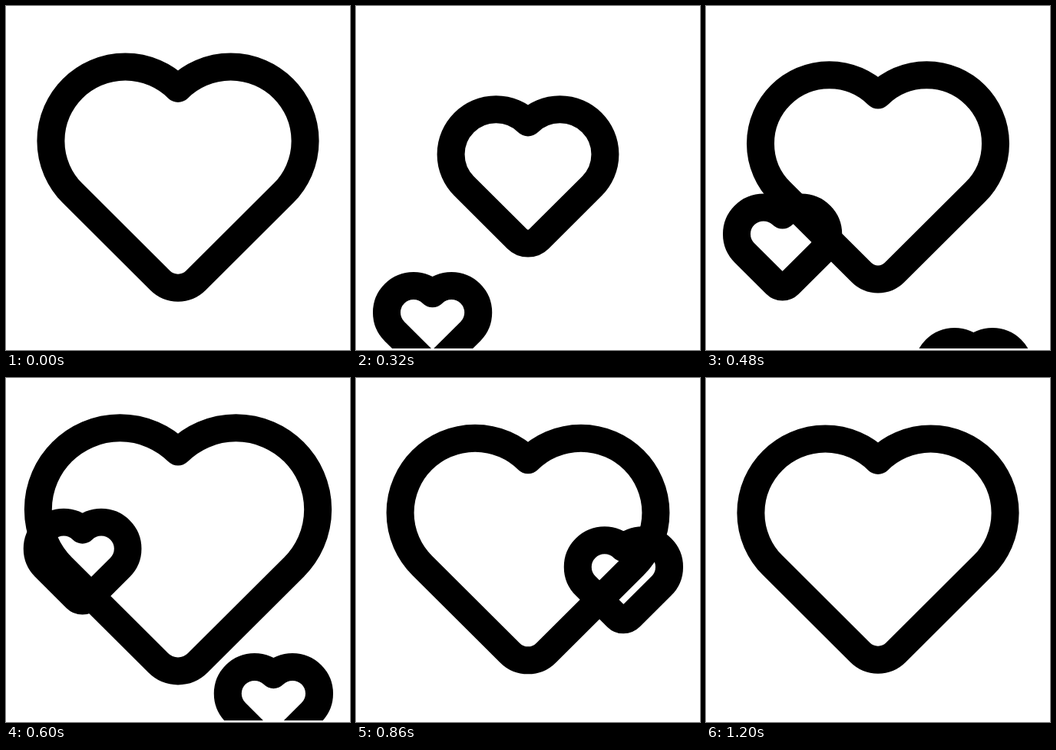
Animation, 448 px wide and 450 px high, one loop 1220 ms. Source, as an HTML page:

```html
<!DOCTYPE html>
<html lang="en">
<head>
<meta charset="utf-8">
<title>Hearts</title>
<style>
  html, body { margin: 0; width: 100%; height: 100%; overflow: hidden; background: #fff; }
  svg { display: block; width: 448px; height: 450px; }
</style>
</head>
<body>
<svg viewBox="0 0 448 450" fill="none" stroke="#000" stroke-linejoin="round" stroke-linecap="round">
  <clipPath id="stage"><rect width="448" height="448"/></clipPath>
  <g id="hearts" clip-path="url(#stage)"></g>
</svg>
<script>
  const LOOP = 1220, STEP = 20, STROKE = 36, SMALL = 0.36;
  const SHAPE = 'M-137.2 24.1A97 97 0 0 1 0 -113.1A97 97 0 0 1 137.2 24.1' +
    'L23.3 138A33 33 0 0 1 -23.3 138Z';
  const group = document.getElementById('hearts');

  function addHeart() {
    const el = document.createElementNS('http://www.w3.org/2000/svg', 'path');
    el.setAttribute('d', SHAPE);
    return group.appendChild(el);
  }

  const big = addHeart(), left = addHeart(), right = addHeart();

  // Smooth 0..1 progress between two times
  function ease(t, from, to) {
    const u = Math.min(1, Math.max(0, (t - from) / (to - from)));
    return u * u * (3 - 2 * u);
  }

  // The line weight is given in stage pixels, whatever the scale
  function place(el, x, y, scale, weight) {
    const shown = scale > 0.001;
    el.setAttribute('visibility', shown ? 'visible' : 'hidden');
    if (!shown) return;
    el.setAttribute('transform', `translate(${x} ${y}) scale(${scale})`);
    el.setAttribute('stroke-width', weight / scale);
  }

  function rise(el, x, t) {
    const size = t < 0 ? 0 : 1 - ease(t, 585, 845);
    place(el, x, 531 - 394 * ease(t, 0, 900), SMALL * size, STROKE * size);
  }

  function draw(t) {
    const beat = 1 - 0.4 * ease(t, 0, 300) + 0.5 * ease(t, 300, 600) - 0.1 * ease(t, 600, 900);
    place(big, 224, 221, beat, STROKE);
    rise(left, 99.6, t);
    rise(right, 348.4, t - 300);
  }

  const start = performance.now();
  function tick() {
    const t = (performance.now() - start) % LOOP;
    draw(Math.floor(t / STEP) * STEP);
    requestAnimationFrame(tick);
  }
  tick();
</script>
</body>
</html>
```
